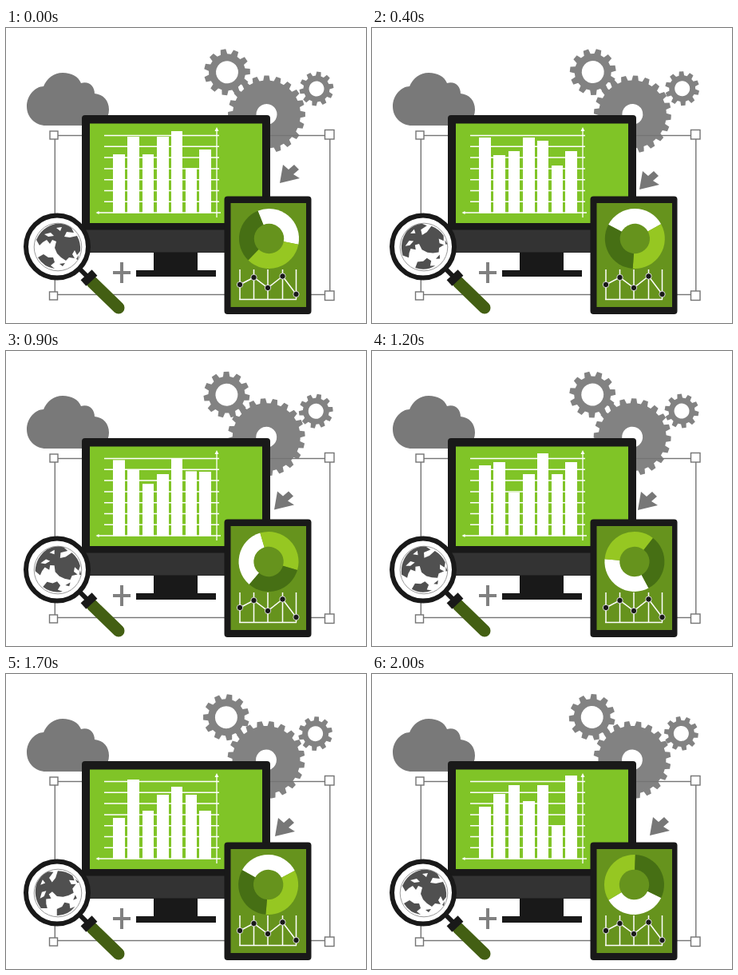
Write an HTML page that moves like this. It is 451 px wide and 369 px high and loops after 2100 ms.

```html
<!DOCTYPE html>
<html lang="en">
<head>
<meta charset="utf-8">
<title>Analytics illustration</title>
<style>
  html, body { margin: 0; width: 100%; height: 100%; overflow: hidden; background: #fff; }
  svg { display: block; width: 451px; height: 369px; }
</style>
</head>
<body>
<svg viewBox="0 0 451 369">
  <path fill="#797979" d="M50 122C37 122 26 112 26 98S37 73 47 73C51 63 60 56 71 56C82 56 91 61 94 69C104 66 111 73 111 82C122 83 129 91 129 102C129 114 121 122 109 122Z"/>
  <g id="gears" fill="#828282" fill-rule="evenodd"></g>

  <g fill="none" stroke="#747474" stroke-width="1.4">
    <rect x="61.3" y="134.5" width="344.5" height="199"/>
    <g fill="#fff">
      <rect x="55" y="129" width="10" height="10"/>
      <rect x="399.5" y="127.500" width="11.500" height="11.500"/>
      <rect x="54.500" y="330" width="10" height="10"/>
      <rect x="399.500" y="329" width="11.500" height="11.500"/>
    </g>
  </g>
  <path fill="#808080" d="M143 293h4v11h9v4h-9v11h-4v-11h-9v-4h9Z"/>
  <path id="arrow" fill="#777" d="M0 0L4 -23L11 -17L18 -23L24 -17L17 -11L25 -6Z"/>

  <g fill="#191919">
    <path d="M185 280h55v23h23v8h-100v-8h22Z"/>
    <rect x="95" y="109" width="236" height="172" rx="4"/>
    <path fill="#333" d="M95 252.500h236v24q0 4-4 4h-228q-4 0-4-4Z"/>
    <rect x="105" y="119.500" width="216" height="124.500" fill="#80c427"/>
  </g>
  <g id="grid" stroke="#fff" stroke-width="1.5"></g>
  <g id="bars" fill="#fff"></g>
  <path d="M115 231H269M264 127V237" stroke="#fff" stroke-width="1.3"/>
  <path d="M112.500 231l4-2v4ZM264 124l-2.500 5h5Z" fill="#fff"/>

  <rect x="273.500" y="210.500" width="109" height="147.500" rx="4" fill="#191919"/>
  <rect x="281.500" y="219" width="94.500" height="130" fill="#66931d"/>
  <g id="donut"></g>
  <g id="chart" stroke="#fff" stroke-width="1.5" fill="none"></g>

  <path d="M108 318L141 350" stroke="#435f13" stroke-width="15" stroke-linecap="round"/>
  <path d="M91 300L104 313" stroke="#191919" stroke-width="6"/>
  <path d="M97 319L111 306" stroke="#191919" stroke-width="10"/>
  <path d="M108 322L115 315" stroke="#435f13" stroke-width="6"/>
  <circle cx="64" cy="273.500" r="39" fill="#fff" stroke="#191919" stroke-width="6"/>
  <circle cx="65" cy="274" r="29.800" fill="#fff" stroke="#999"/>
  <g id="globe" fill="#505050">
    <path d="M-27 -9Q-20 -25 -3 -29Q9 -30 17 -24L20 -18L11 -19L8 -13L15 -12L24 -14Q29 -5 28 5L24 10L21 4L18 9L21 14L14 13L10 17L4 13L-1 8L-4 1L-2 -7L-7 -9L-10 -4L-14 -9L-19 -6L-23 -2Z"/>
    <path d="M-25 13L-18 9L-12 13L-6 13L-4 19L-9 23L-4 27Q-18 25 -25 13Z"/>
    <path d="M2 21L9 20L6 24ZM23 15L26 10L25 16Z"/>
    <path fill="#fff" d="M-17 -16L-9 -18L-5 -14L-12 -13ZM-2 -24L5 -25L3 -20Z"/>
  </g>
</svg>
<script>
const NS = "http://www.w3.org/2000/svg";
const LOOP = 2100, STEP = 100;
const byId = id => document.getElementById(id);

function add(parent, tag, attrs) {
  const node = document.createElementNS(NS, tag);
  for (const key in attrs) node.setAttribute(key, attrs[key]);
  return parent.appendChild(node);
}

const polar = (r, degrees) => {
  const a = degrees * Math.PI / 180;
  return `${(r * Math.sin(a)).toFixed(2)} ${(-r * Math.cos(a)).toFixed(2)}`;
};

function gearPath(teeth, outer, body, hole) {
  const pitch = 360 / teeth, points = [];
  for (let i = 0; i < teeth; i++) {
    const a = i * pitch;
    points.push(polar(body, a - pitch * .32), polar(outer, a - pitch * .2),
                polar(outer, a + pitch * .2), polar(body, a + pitch * .32));
  }
  return `M${points.join("L")}ZM0 ${-hole}A${hole} ${hole} 0 1 0 .01 ${-hole}Z`;
}

const gears = [
  { x: 277, y: 55.3, teeth: 11, size: [29, 23, 14], phase: -10, ratio: .2, drift: 1.3 },
  { x: 326.5, y: 108, teeth: 20, size: [48.5, 42.5, 13], phase: 0, ratio: -.11, drift: .6 },
  { x: 389, y: 76, teeth: 10, size: [21.5, 16.5, 9.5], phase: 8, ratio: .28, drift: 1.6 }
];
for (const gear of gears)
  gear.node = add(byId("gears"), "path", { d: gearPath(gear.teeth, ...gear.size) });

for (let y = 134.5; y < 220; y += 13.8)
  add(byId("grid"), "path", { d: `M123 ${y}H267` });

const BASE = 231.5;
const bars = [134, 152, 171, 189, 207, 225, 242].map(x =>
  add(byId("bars"), "rect", { x, width: x === 171 || x === 207 || x === 225 ? 14 : 15 }));

const RING = 37.5;
["#fff", "#96c722", "#466f14"].forEach((fill, i) => {
  const from = -22 + i * 123, to = i === 2 ? 338 : from + 123;
  add(byId("donut"), "path", {
    fill, d: `M0 0L${polar(RING, from)}A${RING} ${RING} 0 0 1 ${polar(RING, to)}Z`
  });
});
add(byId("donut"), "circle", { r: 18.7, fill: "#66931d" });

const dots = [[293, 321], [310.5, 312], [328, 325], [346.5, 310.5], [363.500, 333]];
add(byId("chart"), "path", { d: dots.map(([x]) => `M${x} 302V339.5`).join("") + "M292 339.5H364" });
add(byId("chart"), "path", { d: "M" + dots.join("L") });
for (const [cx, cy] of dots)
  add(byId("chart"), "circle", { cx, cy, r: 3.7, fill: "#191919", "stroke-width": .8 });

// Poses by step; the last entry closes the loop.
const times = [0, 4, 7, 12, 15, 17, 20, 21];
const barTops = [
  [158, 137, 132, 143, 166, 180, 166, 158],
  [136, 159, 154, 139, 147, 132, 150, 136],
  [158, 154, 159, 177, 184, 171, 139, 158],
  [136, 137, 154, 154, 142, 151, 159, 136],
  [129, 141, 138, 128, 142, 141, 139, 129],
  [175, 172, 148, 154, 172, 151, 190, 175],
  [152, 154, 159, 139, 148, 171, 127, 152]
];
const arrowX = [343, 335, 338, 333, 339, 337, 348, 343];
const arrowY = [194, 202, 198, 199, 205, 203, 202, 194];
const donutTurn = [0, -40, -72, -186, -305, -399, -582, -720];
const globeTurn = [0, -40, -15, -30, -55, -60, 0, 0];

function at(step, values) {
  let i = 0;
  while (step >= times[i + 1]) i++;
  const p = (step - times[i]) / (times[i + 1] - times[i]);
  return values[i] + (values[i + 1] - values[i]) * p;
}

const place = (node, x, y, turn = 0) =>
  node.setAttribute("transform", `translate(${x} ${y}) rotate(${turn})`);

function render(ms) {
  const step = Math.floor((ms % LOOP) / STEP);
  const turn = at(step, donutTurn);
  bars.forEach((bar, i) => {
    const top = at(step, barTops[i]);
    bar.setAttribute("y", top);
    bar.setAttribute("height", BASE - top);
  });
  for (const gear of gears) {
    const shift = gear.drift * step / 20;
    place(gear.node, gear.x - shift, gear.y - shift, gear.phase + turn * gear.ratio);
  }
  place(byId("arrow"), at(step, arrowX), at(step, arrowY));
  place(byId("donut"), 329.5 - step / 20, 263.5, turn);
  place(byId("globe"), 65, 274, at(step, globeTurn));
}

const start = performance.now();
function tick() {
  render(performance.now() - start);
  requestAnimationFrame(tick);
}
tick();
</script>
</body>
</html>
```
